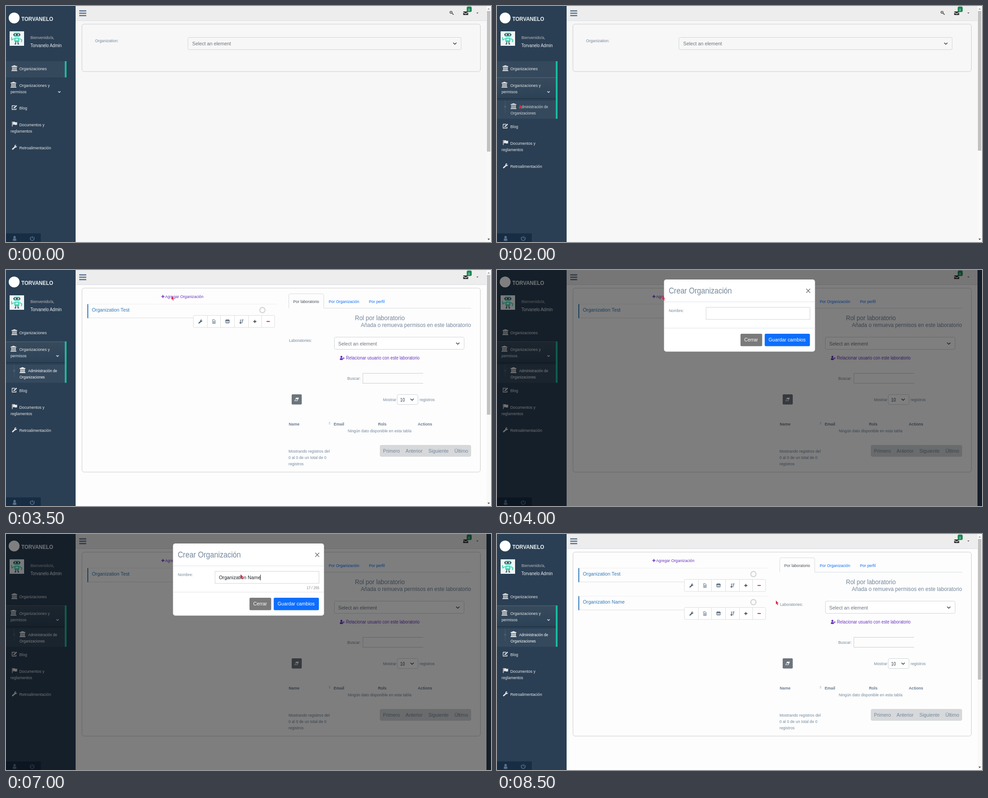
An HTML page for the animation above (9000 ms loop, 1073 by 522 pixels).

```html
<!DOCTYPE html>
<html lang="es">
<head>
<meta charset="utf-8">
<title>Crear organización</title>
<style>
  html, body { margin: 0; width: 100%; height: 100%; overflow: hidden; background: #2a3f54; }
  svg { display: block; width: 100%; height: 100%; }
  text { font-family: "Liberation Sans", Arial, sans-serif; white-space: pre; }
</style>
</head>
<body>
<svg id="stage" viewBox="0 0 1073 522" xmlns="http://www.w3.org/2000/svg"></svg>
<script>
const LOOP = 9000;
const SLATE = '#73879c', LIGHT = '#e7e7e7', PURPLE = '#6a35c0', BLUE = '#0d6efd', EDGE = '#ced4da';

// The desktop is 1600 x 715 css pixels shown on a 1073 x 522 stage.
const text = (x, y, str, size = 13, fill = SLATE, attrs = '') =>
  `<text transform="translate(${x} ${y}) scale(.6706 .73)" font-size="${size}" fill="${fill}" ${attrs}>${str}</text>`;
const bold = (x, y, str, size = 13, fill = '#687b90') => text(x, y, str, size, fill, 'font-weight="bold"');
const rect = (x, y, w, h, fill, attrs = '') =>
  `<rect x="${x}" y="${y}" width="${w}" height="${h}" fill="${fill}" ${attrs}/>`;
const box = (x, y, w, h, fill = '#fff', stroke = EDGE, r = 3) =>
  rect(x, y, w, h, fill, `rx="${r}" stroke="${stroke}"`);
const line = (d, stroke, width = 1) => `<path d="${d}" fill="none" stroke="${stroke}" stroke-width="${width}"/>`;
const at = (x, y, content) => `<g transform="translate(${x} ${y})">${content}</g>`;
const during = (spans, content) => `<g data-show="${spans}">${content}</g>`;
const chevron = (x, y, stroke = '#343a40', r = 3.6) =>
  line(`M${x - r} ${y - r / 2}l${r} ${r}l${r} ${-r}`, stroke, 1.5);

// Icons are centred on their own origin.
const shapes = {
  bank: 'M0-6.5L6.5-4V-2.8H-6.5V-4ZM-4.8-2h1.8v5h-1.8zM-2-2h1.6v5H-2zM.6-2h1.6v5H.6zM3.2-2H5v5H3.2zM-5.6 3.4H5.6v1.1H-5.6zM-6.5 5.1h13v1.4h-13z',
  flag: 'M-5.5-5.5h1.3v11h-1.3zM-3.6-4.4Q-1-6 1-4.4T5.8-4.6V1.6Q3 3 1 1.8T-3.6 2Z',
  wrench: 'M-5.4 3.6L.2-1.6Q-.6-4.8 2.8-5.6L4.2-5.3L2.4-3.4L2.8-1.9L4.2-1.6L5.6-3.4Q6 .8 1.8.8L-3.4 5.6Q-5 6.2-5.4 3.6Z',
  user: 'M0-5.5a2.6 2.9 0 0 1 0 5.8a2.6 2.9 0 0 1 0-5.8zM-4 5Q-4.2.4-2 .2Q0 1.6 2 .2Q4.2.4 4 5Q0 6-4 5Z',
  envelope: 'M-5.5-4h11v1L0 .8L-5.5-3ZM-5.5-1.6L0 2.2L5.5-1.6V4h-11z',
  plus: 'M-1-4H1V-1H4V1H1V4H-1V1H-4V-1H-1Z',
  minus: 'M-3.8-1H3.8V1H-3.8Z',
  eraser: 'M-1.4-3.6H5L1.6 3.6H-5ZM-2.4-.4L-3.7 2.5H.9L2.2-.4Z'
};
const icon = (name, x, y, fill = LIGHT, scale = 1) =>
  `<path transform="translate(${x} ${y}) scale(${scale})" d="${shapes[name]}" fill="${fill}" fill-rule="evenodd"/>`;
const editIcon = (x, y) => at(x, y,
  line('M3.8 1.5V4.5H-5V-4H1.5', LIGHT, 1.3) + line('M-1.5 1.8L5-4.4', LIGHT, 2.4));
const powerIcon = (x, y) => at(x, y,
  line('M-2.6-3.2A4.4 4.4 0 1 0 2.6-3.2M0-5V0', '#5a738e', 1.6));
const keyIcon = (x, y) => at(x, y,
  '<ellipse cx="-1.4" cy="-1.2" rx="2.4" ry="2.2" fill="none" stroke="#444" stroke-width="1.4"/>' +
  line('M.4.4L4.4 4.2M2.2 3.6L3.4 2.2', '#444', 1.4));
const fileIcon = (x, y) => at(x, y,
  line('M-3-4.2H1L3-2V4.3H-3ZM-1.6-.6H1.6M-1.6 1H1.6M-1.6 2.6H1.6', '#4d6075', .9));
const tableIcon = (x, y) => at(x, y,
  box(-4, -3.5, 8, 7, '#fff', '#405468', 1) + rect(-4, -3.8, 8, 2.4, '#405468') +
  line('M-3 .2H3M-3 1.9H3', '#6c7c8e', .8));
const sortIcon = (x, y) => at(x, y,
  line('M-2.4-4.5V3.8M-4.2 2L-2.4 4.2L-.6 2M.2-4H4.5M.2-1.6H3.6M.2.8H2.7M.2 3.2H1.8', '#405468', 1.2));

function robot() {
  const teal = '#3fd3b4', dark = '#31515c';
  return rect(8, 56, 32, 32, '#eef6f5') +
    rect(17, 59, 14, 9, teal, 'rx="3"') + rect(16, 61.5, 16, 4, dark, 'rx="2"') +
    '<circle cx="20.5" cy="63.5" r="1.4" fill="#fff"/><circle cx="27.5" cy="63.5" r="1.4" fill="#fff"/>' +
    rect(18.5, 70, 11, 9.5, teal, 'rx="2"') + rect(21, 72, 6, 4, '#d6f5ee') +
    line('M18 72L13 75L12 69M30 72L35 75L34 80', teal, 2) +
    line('M21.5 79V84H19M26.5 79V84H29', dark, 1.8);
}

const lowerMenu = dy => at(0, dy,
  editIcon(18.5, 224.5) + text(29.5, 229, 'Blog', 13, LIGHT) +
  icon('flag', 18.8, 261) + text(29.5, 266, 'Documentos y', 13, LIGHT) + text(10, 280, 'reglamentos', 13, LIGHT) +
  icon('wrench', 18.6, 312.5) + text(29.5, 317, 'Retroalimentación', 13, LIGHT));

const subItem = fill =>
  icon('bank', 36.5, 221.5, fill) + text(49, 226, 'Administración de', 12, fill) + text(30, 239.5, 'Organizaciones', 12, fill);

function sidebar() {
  const green = '#1abb9c', raised = '#35495d';
  return rect(0, 0, 154, 522, '#2a3f54') +
    '<circle cx="18" cy="26.5" r="12" fill="#fff"/>' + bold(34, 33, 'TORVANELO', 17, '#ecf0f1') +
    robot() + text(54, 73, 'Bienvenido/a,', 13, '#bab8b8') + text(54, 90.5, 'Torvanelo Admin', 14, '#ecf0f1') +
    during('0-2500', rect(0, 122, 134, 36, raised) + rect(130, 122, 4, 36, green)) +
    during('1000-9000',
      rect(0, 158, 130, 46, 'url(#active)') + rect(0, 158, 130, 1, '#576777') + rect(0, 204, 130, 1, '#1f2f3f') +
      rect(130, 158, 4, 91.5, green)) +
    during('2000-9000', rect(0, 209, 130, 40.5, raised)) +
    during('1000-9000', rect(17.5, 209, 1, 28, '#475c6f') + '<circle cx="18" cy="222.5" r="2.6" fill="#475c6f"/>') +
    during('1000-2000', subItem('#b8c0c8')) + during('2000-2500', subItem('#d3d8dd')) + during('2500-9000', subItem('#fff')) +
    icon('bank', 18.5, 137.5) + text(29.5, 142, 'Organizaciones', 13, LIGHT) +
    icon('bank', 16.5, 174) + text(29.5, 178.5, 'Organizaciones y', 13, LIGHT) + text(10, 192.5, 'permisos', 13, LIGHT) +
    during('0-1000', chevron(118, 190, LIGHT, 2.6) + lowerMenu(0)) +
    during('1000-9000', chevron(114, 190, LIGHT, 2.6) + lowerMenu(41)) +
    rect(0, 503, 77, 19, '#172d44') + icon('user', 19, 514, '#5a738e') + powerIcon(58, 514);
}

function topBar() {
  return rect(154, 0, 909, 32, '#ededed') + rect(154, 32, 909, 1, '#d9dee4') +
    [9.5, 14.7, 19.9].map(y => rect(162, y, 15.5, 2.6, '#5a738e')).join('') +
    during('0-2500', keyIcon(986, 15)) +
    icon('envelope', 1017, 16, '#333') + rect(1019.3, 1.3, 11, 12, '#198754', 'rx="3"') +
    text(1022.6, 10.7, '0', 10, '#fff') + '<path d="M1040.6 14.6h4.6l-2.3 2.4z" fill="#515356"/>';
}

function scrollBar() {
  const thumb = bottom => rect(1064, 11, 7.5, bottom - 11, '#c1c1c1');
  return rect(1063, 0, 10, 522, '#f9f9f9') +
    '<path d="M1065.2 8h5.4l-2.7-3.4z" fill="#a3a3a3"/><path d="M1065.2 514.5h5.4l-2.7 3.4z" fill="#505050"/>' +
    during('0-2000,2500-3500,8500-9000', thumb(322)) + during('2000-2500,3500-4000', thumb(320));
}

const startPage = () => rect(154, 33, 909, 489, '#f7f7f7') +
  box(168, 40, 881.5, 105, '#f7f7f7', '#ccc', 5) + text(197, 80, 'Organization:') +
  box(402.5, 69.5, 604.5, 27, '#f7f7f7') + text(412, 87, 'Select an element', 16, '#6c757d') + chevron(993, 83);

function orgItem(dy, name) {
  return at(0, dy,
    rect(180, 75, 420, 1, '#eee') + rect(180, 105.5, 415, 1, '#ddd') + rect(180, 75.5, 2, 31, '#337ab7') +
    text(190, 91.7, name, 16, '#337ab7') +
    '<circle cx="567.3" cy="88.7" r="5.8" fill="none" stroke="#d8d8d8" stroke-width="2.6"/>' +
    box(414.5, 100.5, 180, 26.5, '#fff', '#ddd', 2) +
    [445.5, 474.5, 505.5, 536.5, 565.5].map(x => rect(x - .5, 101, 1, 26, '#ddd')).join('') +
    icon('wrench', 430, 114, '#405468', .8) + fileIcon(460, 114) + tableIcon(490, 113.8) + sortIcon(521, 114) +
    icon('plus', 550.5, 113.8, '#444', .85) + icon('minus', 580, 113.8, '#d9232e', .95));
}

function permissions() {
  return line('M625.5 84.5V56.5q0-4 4-4H699q4 0 4 4V84.5H1029', '#d5dade') +
    text(635.5, 72.5, 'Por laboratorio', 13, '#495057') +
    text(714, 72.5, 'Por Organización', 13, BLUE) + text(803, 72.5, 'Por perfil', 13, BLUE) +
    text(772, 110.5, 'Rol por laboratorio', 20) + text(785, 125.5, 'Añada o remueva permisos en este laboratorio', 17.5) +
    text(626, 159, 'Laboratories:') +
    box(726.5, 148.5, 287, 27) + text(735, 166.5, 'Select an element', 16, '#6c757d') + chevron(999.5, 162.5) +
    icon('user', 742, 194.5, PURPLE, .85) + icon('plus', 747, 195, PURPLE, .55) +
    text(752, 198, 'Relacionar usuario con este laboratorio', 14, PURPLE) +
    text(755, 242.5, 'Buscar:') + line('M923 228.5H789.5V250.5H923', '#ccc') +
    rect(632, 275, 22.3, 22.5, '#6c757d', 'rx="2"') + icon('eraser', 643, 286.2, '#fff') +
    text(834, 289.7, 'Mostrar') + box(865.5, 275.5, 46, 22) + text(872, 290.5, '10', 14, '#343a40') +
    chevron(898.5, 286.5) + text(915, 289.7, 'registros') +
    bold(625.5, 343.5, 'Name') + line('M714.5 338.5l1.3-2l1.3 2M714.3 340.5h3', '#8a98a8', .8) +
    bold(725, 343.5, 'Email') + bold(823, 343.5, 'Rols') + bold(911, 343.5, 'Actions') +
    text(756, 358.5, 'Ningún dato disponible en esta tabla') +
    text(625, 403.8, 'Mostrando registros del') + text(625, 418.2, '0 al 0 de un total de 0') + text(625, 432.2, 'registros') +
    rect(827, 387, 202, 26, '#d6d8da', 'rx="4"') +
    [[834, 'Primero'], [884, 'Anterior'], [934.5, 'Siguiente'], [992, 'Último']]
      .map(([x, label]) => text(x, 403.8, label, 16)).join('');
}

const adminPage = () => rect(154, 33, 909, 489, '#fdfdfd') +
  box(168, 40, 881.5, 407, '#fdfdfd', '#ccc', 5) +
  icon('plus', 347.2, 58.7, PURPLE, .85) + text(352, 62.2, 'Agregar Organización', 13, PURPLE) +
  orgItem(0, 'Organization Test') + during('8500-9000', orgItem(62, 'Organization Name')) + permissions();

function modal() {
  const counter = (spans, label) => during(spans, text(693, 122, label, 11.5, '#868686', 'text-anchor="end"'));
  const caret = (spans, x) => during(spans, rect(x, 90, 1, 12.5, '#111'));
  const save = (spans, fill) => during(spans, rect(592.3, 141, 100, 27.5, fill, 'rx="2.5"'));
  return rect(1063, 0, 10, 522, '#2a3f54') + rect(0, 0, 1073, 522, '#000', 'opacity=".5"') +
    rect(369.5, 21, 334, 159.5, '#fff', 'rx="5"') +
    text(380, 52, 'Crear Organización', 24) + line('M684.3 41.5l8.6 9M692.9 41.5l-8.6 9', '#6b6b6b', 1.3) +
    rect(369.5, 70, 334, 1, '#dee2e6') + rect(369.5, 128, 334, 1, '#dee2e6') +
    text(380, 92.7, 'Nombre:') + box(462.5, 82.5, 230, 26.7, '#fff', EDGE, 0) +
    counter('5500-7000', '0 / 255') + counter('7000-8500', '17 / 255') +
    during('7000-8500', text(471, 100.3, 'Organization Name', 16, '#212529')) +
    caret('6000-7000', 471) + caret('7000-7500,8000-8500', 562.4) +
    rect(538.7, 141, 48, 27.5, '#7a7a7a', 'rx="2.5"') + text(547, 158.3, 'Cerrar', 16, '#fff') +
    save('4000-8000', BLUE) + save('8000-8500', '#0b5ed7') + text(600.7, 158.3, 'Guardar cambios', 16, '#fff');
}

const pointer = (spans, x, y) => during(spans, at(x, y,
  '<path d="M0 0V8.6L1.9 7L3.4 10.4L4.9 9.7L3.5 6.5H6Z" fill="#dc2742"/>'));

const stage = document.getElementById('stage');
stage.innerHTML =
  `<defs><linearGradient id="active" x2="0" y2="1">
    <stop stop-color="#384b5d"/><stop offset="1" stop-color="#2c4257"/></linearGradient></defs>` +
  during('0-2500', startPage()) + during('2500-9000', adminPage()) +
  topBar() + sidebar() + scrollBar() + during('4000-8500', modal()) +
  pointer('500-2000', 33, 170) + pointer('2000-3500', 50, 218) + pointer('3500-5000', 366, 57) +
  pointer('5000-8000', 519, 89) + pointer('8000-9000', 617, 147);

const timed = [...stage.querySelectorAll('[data-show]')].map(node => ({
  node, spans: node.dataset.show.split(',').map(span => span.split('-').map(Number))
}));
const start = performance.now();

function draw() {
  const now = (performance.now() - start) % LOOP;
  for (const { node, spans } of timed)
    node.style.display = spans.some(([from, to]) => now >= from && now < to) ? '' : 'none';
  requestAnimationFrame(draw);
}
draw();
</script>
</body>
</html>
```
